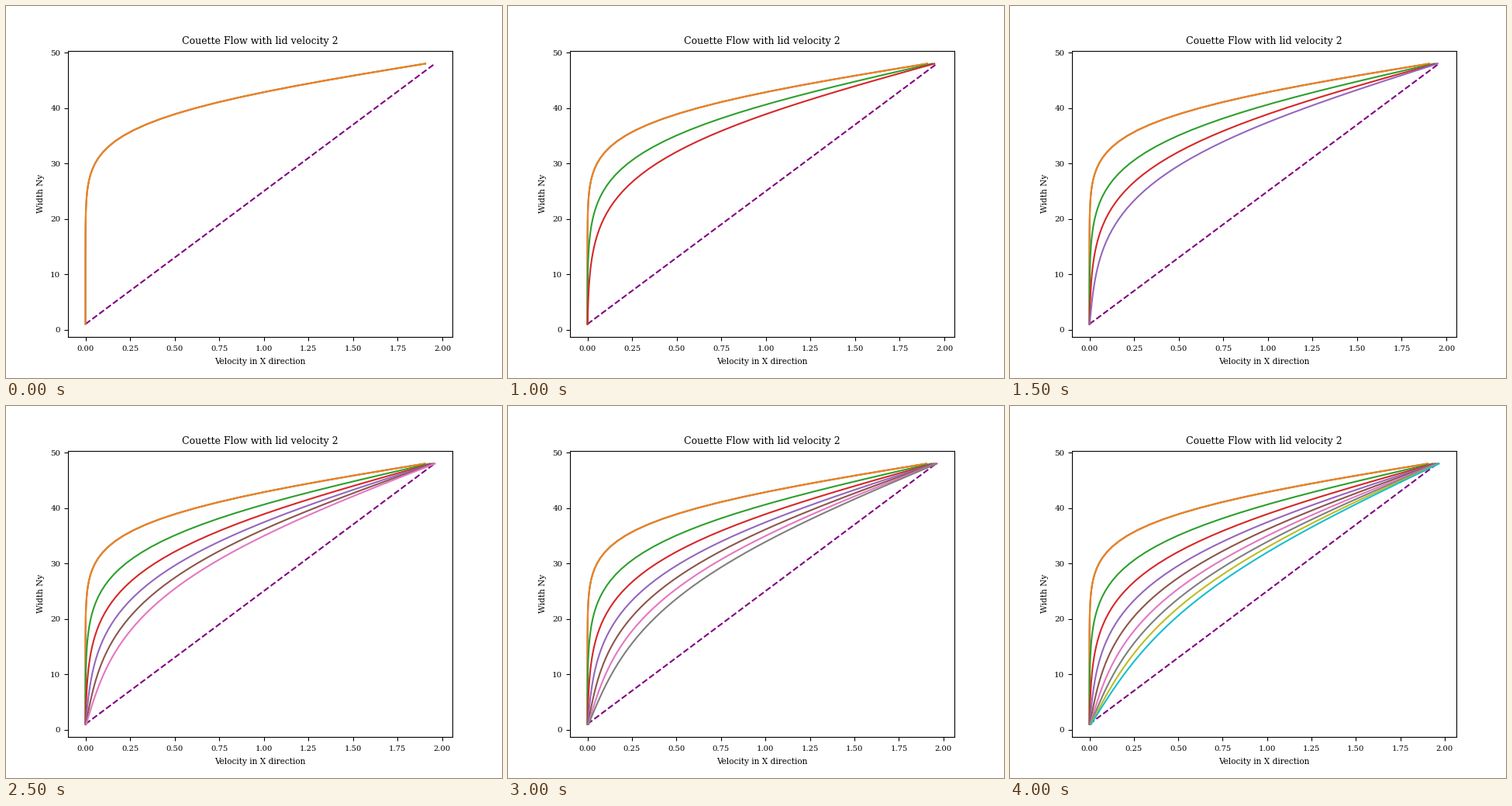
Animation, 640 px wide and 480 px high, one loop 4.5 s. Source, as a matplotlib script:

```python
import numpy as np
import matplotlib.pyplot as plt
from matplotlib.animation import FuncAnimation

LID = 2.0          # lid velocity
ROWS = 48          # fluid nodes across the channel
NU = 1 / 6         # lattice viscosity at omega = 1
LEAD = 10          # lattice steps before the first interval
STEPS = 200        # lattice steps between two plotted profiles
CURVES = 9

plt.rcParams.update({
    "font.family": "DejaVu Serif",
    "axes.titlesize": 9,
    "axes.labelsize": 7.6,
    "xtick.labelsize": 7.2,
    "ytick.labelsize": 7.4,
    "xtick.major.pad": 4,
    "axes.labelpad": 5,
})


def advance(u, steps):
    """Diffuse momentum; both walls sit half a cell outside the nodes."""
    for _ in range(steps):
        padded = np.concatenate(([-u[0]], u, [2 * LID - u[-1]]))
        u = u + NU * (padded[2:] - 2 * u + padded[:-2])
    return u


def solve():
    u = advance(np.zeros(ROWS), LEAD)
    profiles = []
    for _ in range(CURVES):
        u = advance(u, STEPS)
        profiles.append(u)
    return profiles


y = np.arange(1, ROWS + 1)
steady = LID * (y - 1) / ROWS
profiles = solve()

fig, ax = plt.subplots(figsize=(6.4, 4.8), dpi=100)
ax.set_title("Couette Flow with lid velocity 2")
ax.set_xlabel("Velocity in X direction")
ax.set_ylabel("Width Ny")
ax.plot(steady, y, "--", color="purple")

# The first profile is plotted twice, in blue and then in orange.
lines = [ax.plot(u, y)[0] for u in profiles[:1] + profiles]


def update(n):
    for i, line in enumerate(lines):
        line.set_visible(i <= n + 1)
    right = max(steady[-1], profiles[n][-1])
    ax.set_xlim(-0.05 * right, 1.05 * right)
    return lines


anim = FuncAnimation(fig, update, frames=CURVES, init_func=lambda: update(0),
                     interval=500, repeat=True)
plt.show()
```
